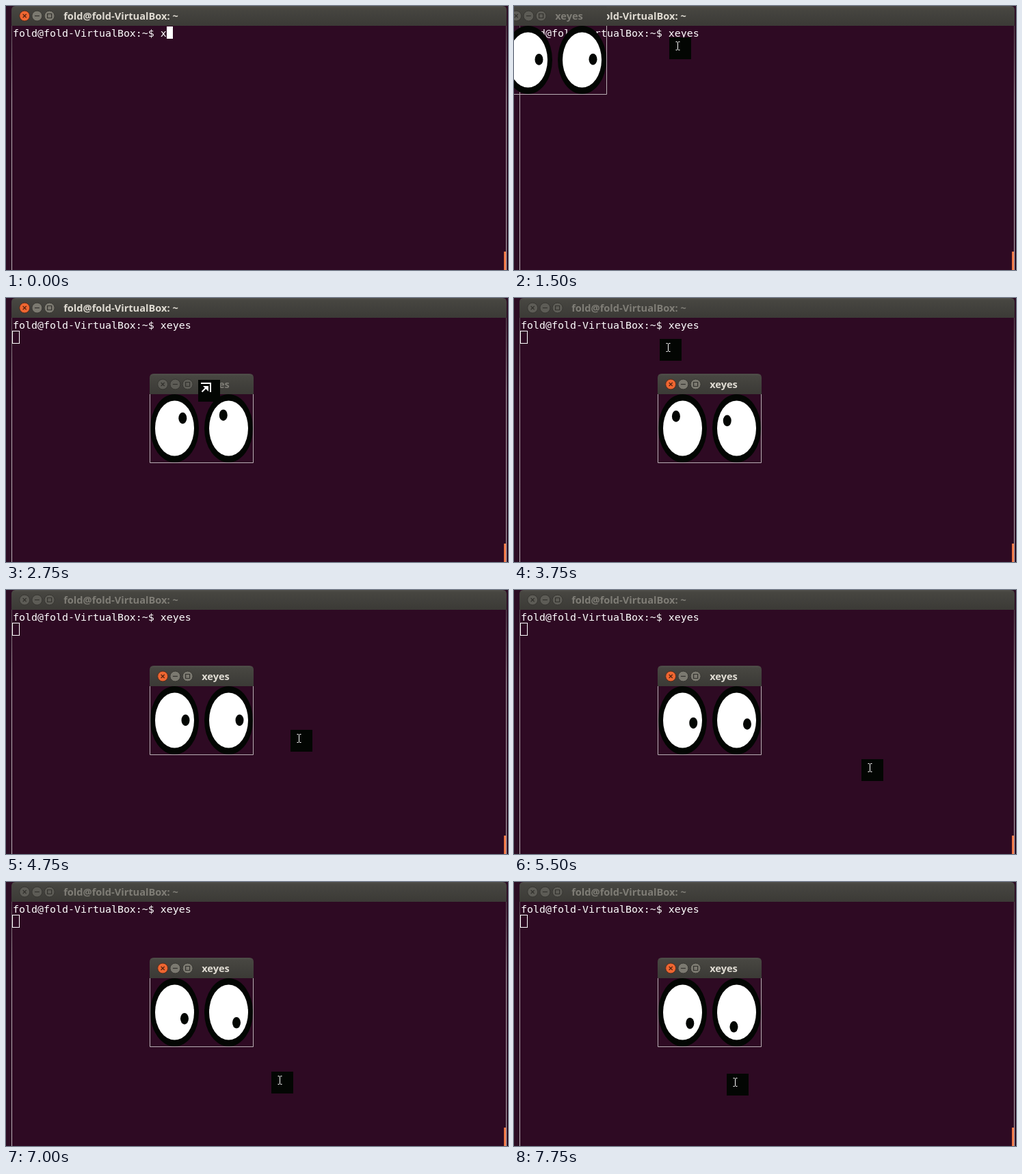
Animation of 734x387 px, one loop 8 s. Source, as an HTML page:

```html
<!DOCTYPE html>
<html lang="en">
<head>
<meta charset="utf-8">
<title>xeyes</title>
<style>
  html, body { margin: 0; width: 100%; height: 100%; overflow: hidden; background: #2e0b24; }
  svg { display: block; }
  text { white-space: pre; }
  .mono { font: 14.95px "DejaVu Sans Mono", monospace; fill: #fff; }
  .title { font: bold 14.6px "Noto Sans", "Open Sans", sans-serif; fill: #7f7d76; }
  .btn { fill: #5d5c56; stroke: #363531; }
  .sign { fill: none; stroke: #32312d; stroke-width: 1.2; }
  .on .title { fill: #dfdbd2; }
  .on .btn { fill: #7b7970; }
  .on .close { fill: #ee6631; stroke: #52291b; }
  .on .close + .sign { stroke: #50200f; }
</style>
</head>
<body>
<svg width="734" height="387" viewBox="0 0 734 387">
  <defs>
    <linearGradient id="bar" x2="0" y2="1">
      <stop offset="0" stop-color="#504f4a"/>
      <stop offset=".12" stop-color="#474641"/>
      <stop offset="1" stop-color="#3b3a36"/>
    </linearGradient>
    <linearGradient id="edge" x2="0" y2="1">
      <stop offset="0" stop-color="#5d4d57"/>
      <stop offset=".3" stop-color="#b3a8ae"/>
      <stop offset="1" stop-color="#bcb2b8"/>
    </linearGradient>
  </defs>
  <rect width="734" height="387" fill="#2c0d24"/>
  <g id="term">
    <rect x="8" y="28" width="724" height="359" fill="#2e0a23"/>
    <path d="M8 29V6Q8 0 14 0H726Q732 0 732 6V29Z" fill="url(#bar)"/>
    <rect x="8" y="29" width="1" height="358" fill="url(#edge)"/>
    <rect x="731" y="29" width="1" height="358" fill="url(#edge)"/>
    <rect x="728" y="360" width="3" height="27" fill="#f07746"/>
    <text class="mono" id="line" x="10" y="45"></text>
    <rect id="caret" y="30"/>
  </g>
  <g id="eyes">
    <path d="M.5 29V130.5H151.5V29" fill="none" stroke="#b9aeb4"/>
    <path d="M0 30V6Q0 0 6 0H146Q152 0 152 6V30Z" fill="url(#bar)"/>
  </g>
  <g id="mouse">
    <rect width="32" height="32" fill="#030603"/>
    <path id="beam" d="M9.5 6.5H11.5L12.5 7.5L13.5 6.5H15.5M12.5 7V18M9.5 18.5H11.5L12.5 17.5L13.5 18.5H15.5" fill="none" stroke="#fff"/>
    <g id="corner">
      <path d="M4 5H18V18M5.5 17.5L13 10" fill="none" stroke="#fff" stroke-width="2"/>
      <path d="M7 9H15V17Z" fill="#fff"/>
    </g>
  </g>
</svg>
<script>
const NS = 'http://www.w3.org/2000/svg';
const $ = id => document.getElementById(id);
const STEP = 250, LOOP = 8000;
const PROMPT = 'fold@fold-VirtualBox:~$ ', COMMAND = 'xeyes';
const SHOW = 5, DROP = 11, FOCUS = 12;
const CENTERS = [36.5, 115.5], MID = 80;

function add(parent, tag, attrs, text) {
  const el = document.createElementNS(NS, tag);
  for (const k in attrs) el.setAttribute(k, attrs[k]);
  if (text) el.textContent = text;
  parent.appendChild(el);
  return el;
}

function set(el, attrs) {
  for (const k in attrs) el.setAttribute(k, attrs[k]);
}

// Window buttons and caption; x, y is the centre of the close button
function header(parent, x, y, caption) {
  const signs = ['M-2.5 -2.5L2.5 2.5M2.5 -2.5L-2.5 2.5', 'M-3.5 0H3.5', 'M-3 -3H3V3H-3Z'];
  signs.forEach((d, i) => {
    const g = add(parent, 'g', { transform: `translate(${x + i * 18.2} ${y})` });
    add(g, 'circle', { r: 7.5, class: i ? 'btn' : 'btn close' });
    add(g, 'path', { d, class: 'sign' });
  });
  add(parent, 'text', { class: 'title', x: x + 57, y: y + 5 }, caption);
}

header($('term'), 27.2, 14.5, 'fold@fold-VirtualBox: ~');
header($('eyes'), 19.2, 15.5, 'xeyes');

const pupils = CENTERS.map(cx => {
  add($('eyes'), 'ellipse', { cx, cy: MID, rx: 35.5, ry: 50, fill: '#030603' });
  add($('eyes'), 'ellipse', { cx, cy: MID, rx: 28.5, ry: 40.5, fill: '#fff' });
  return add($('eyes'), 'ellipse', { rx: 6, ry: 8.3, fill: '#030603' });
});

// Pointer stops from SHOW on, one per step; a second pair is a lagging gaze
const path = [
  [288, 78], [239, 58, 288, 69], [180, 124], [110, 70], [80, 20], [73, 13],
  [299, 125], [299, 125], [190, 350], [143, 80], [225, 72, 184, 76],
  [285, 80], [350, 110], [405, 165], [428, 217, 423, 190], [192, 296],
  [290, 308], [520, 260], [653, 200], [430, 290], [265, 283, 263, 272],
  [143, 300], [200, 318], [400, 290], [577, 160], [230, 230], [323, 293, 308, 283]
];

// Pupil offset toward the gaze point, held inside a 16 by 22 ellipse
function look(dx, dy) {
  const k = Math.max(1, Math.hypot(dx / 16, dy / 22));
  return [dx / k, dy / k];
}

function draw(ms) {
  const n = Math.floor((ms % LOOP) / STEP);
  const open = n >= SHOW, focus = n >= FOCUS;
  const typed = COMMAND.slice(0, n + 1);
  $('line').textContent = PROMPT + typed;
  set($('caret'), open
    ? { x: 9.5, y: 48.5, width: 10, height: 18, fill: 'none', stroke: '#fff' }
    : { x: 10 + 9 * (PROMPT + typed).length, y: 30, width: 9, height: 18, fill: '#fff', stroke: 'none' });
  set($('term'), { class: focus ? '' : 'on' });
  set($('eyes'), { class: focus ? 'on' : '', display: open ? 'inline' : 'none' });
  set($('mouse'), { display: open ? 'inline' : 'none' });
  if (!open) return;

  const [wx, wy] = n < DROP ? [-16, -1] : [210, 111];
  const [mx, my, gx = mx, gy = my] = path[n - SHOW];
  const drag = n === DROP - 1 || n === DROP;
  set($('eyes'), { transform: `translate(${wx} ${wy})` });
  set($('mouse'), { transform: drag ? `translate(${mx - 18} ${my - 5})` : `translate(${mx - 12} ${my - 12})` });
  set($('beam'), { display: drag ? 'none' : 'inline' });
  set($('corner'), { display: drag ? 'inline' : 'none' });
  pupils.forEach((p, i) => {
    const [dx, dy] = look(gx - wx - CENTERS[i], gy - wy - MID);
    set(p, { cx: CENTERS[i] + dx, cy: MID + dy });
  });
}

const start = performance.now();
function tick() {
  draw(performance.now() - start);
  requestAnimationFrame(tick);
}
draw(0);
requestAnimationFrame(tick);
</script>
</body>
</html>
```
